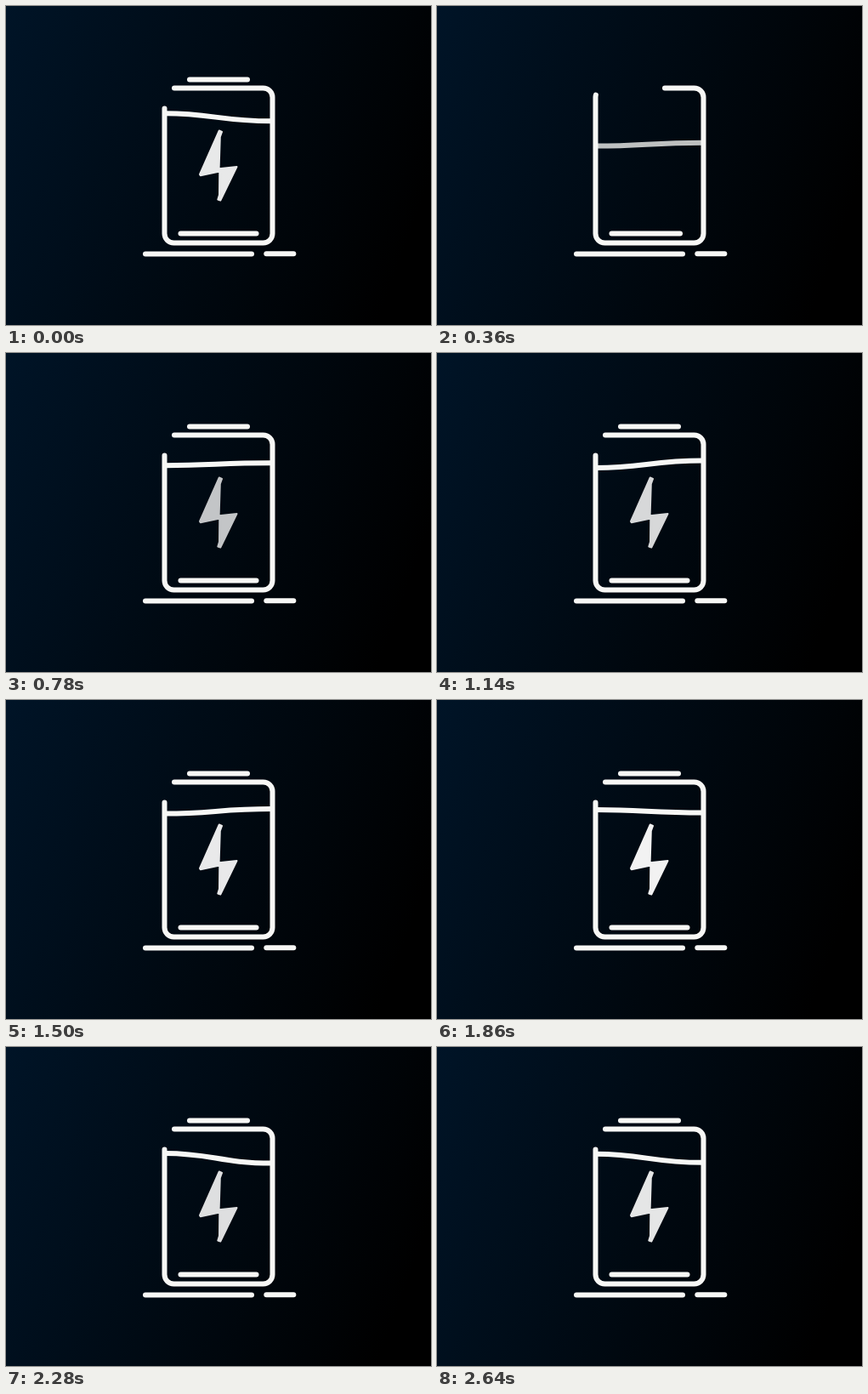
Animation, 500 px wide and 375 px high, one loop 2700 ms. Source, as an HTML page:

```html
<!DOCTYPE html>
<html lang="en">
<head>
<meta charset="utf-8">
<title>Charging battery</title>
<style>
  html, body { margin: 0; width: 100%; height: 100%; overflow: hidden; background: #000; }
  svg {
    display: block; width: 500px; height: 375px;
    background: linear-gradient(110deg, #001427, #000 90%);
  }
  path { fill: none; stroke: #f7f7f5; stroke-width: 6; stroke-linecap: round; }
  #wave { stroke-linecap: butt; }
  #bolt { fill: #f7f7f7; stroke: #f7f7f7; stroke-width: 2; stroke-linejoin: round; }
</style>
</head>
<body>
<svg viewBox="0 0 500 375">
  <path id="wave"/>
  <path id="body" d="M198 96.4H302.5a11 11 0 0 1 11 11V267.5a11 11 0 0 1-11 11H197.5a11 11 0 0 1-11-11V107.4a11 11 0 0 1 11-11z"/>
  <path id="cap" d="M216 86.5H284"/>
  <path id="level" d="M205.5 267.5H294.5"/>
  <path id="ground" d="M164 291.6H289"/>
  <path id="dash" d="M306.3 291.2H338.3"/>
  <path id="bolt" d="M250.8 146.5L254 148L251.8 154L250.6 191.2L271.5 189L252.3 228.5L249.3 227.5L251 222L251.3 194.5L228.8 199.3L228 198z"/>
</svg>
<script>
const LOOP = 2700;
const START = 60; // the drawing restarts here
const $ = id => document.getElementById(id);

const ramp = (t, from, to) => Math.min(1, Math.max(0, (t - from) / (to - from)));
const easeOut = u => 1 - (1 - u) ** 2;
const easeInOut = u => u < .5 ? 4 * u ** 3 : 1 - 4 * (1 - u) ** 3;
const overshoot = (u, k) => 1 + (k + 1) * (u - 1) ** 3 + k * (u - 1) ** 2;
const swing = (t, peak, period) => Math.cos(2 * Math.PI * (t - peak) / period);

function trim(id, from, to) {
  const s = $(id).style, len = to - from;
  s.visibility = len > .5 ? 'visible' : 'hidden';
  s.strokeDasharray = `${Math.max(len, 0)} 2000`;
  s.strokeDashoffset = -from;
}

const grow = (id, t, from, to) =>
  trim(id, 0, $(id).getTotalLength() * easeOut(ramp(t, from, to)));

// the outline opens both ways from its lower right corner
function drawBody(t) {
  const origin = 300, end = 568;
  trim('body',
    origin * (1 - easeInOut(ramp(t, START, 550))),
    origin + (end - origin) * overshoot(ramp(t, START, 540), 1.28));
}

// the surface rises, then sloshes from side to side
function drawWave(t) {
  const p = easeOut(ramp(t, 145, 590));
  const mid = 250 + (130.8 - 250) * p;
  const tilt = 10.3 * swing(t, 1200, 2400) - 1.8 + 60 * p * (1 - p);
  const left = mid + tilt / 2, right = mid - tilt / 2;
  $('wave').setAttribute('d', `M187 ${left}C242 ${left} 252 ${right} 313 ${right}`);
  $('wave').style.opacity = easeOut(ramp(t, 180, 526));
}

function drawBolt(t) {
  const fade = 1 - Math.exp(-Math.max(0, t - 420) / 200);
  $('bolt').style.opacity = fade * (.94 + .045 * swing(t, 1760, 1240));
}

function draw(now) {
  const clock = now % LOOP;
  const t = clock < START ? clock + LOOP : clock;
  drawBody(t);
  drawWave(t);
  drawBolt(t);
  grow('ground', t, START, 270);
  grow('dash', t, 100, 280);
  grow('level', t, 100, 476);
  grow('cap', t, 400, 600);
}

let origin;
function tick(now) {
  origin ??= now;
  draw(now - origin);
  requestAnimationFrame(tick);
}
draw(0);
requestAnimationFrame(tick);
</script>
</body>
</html>
```
